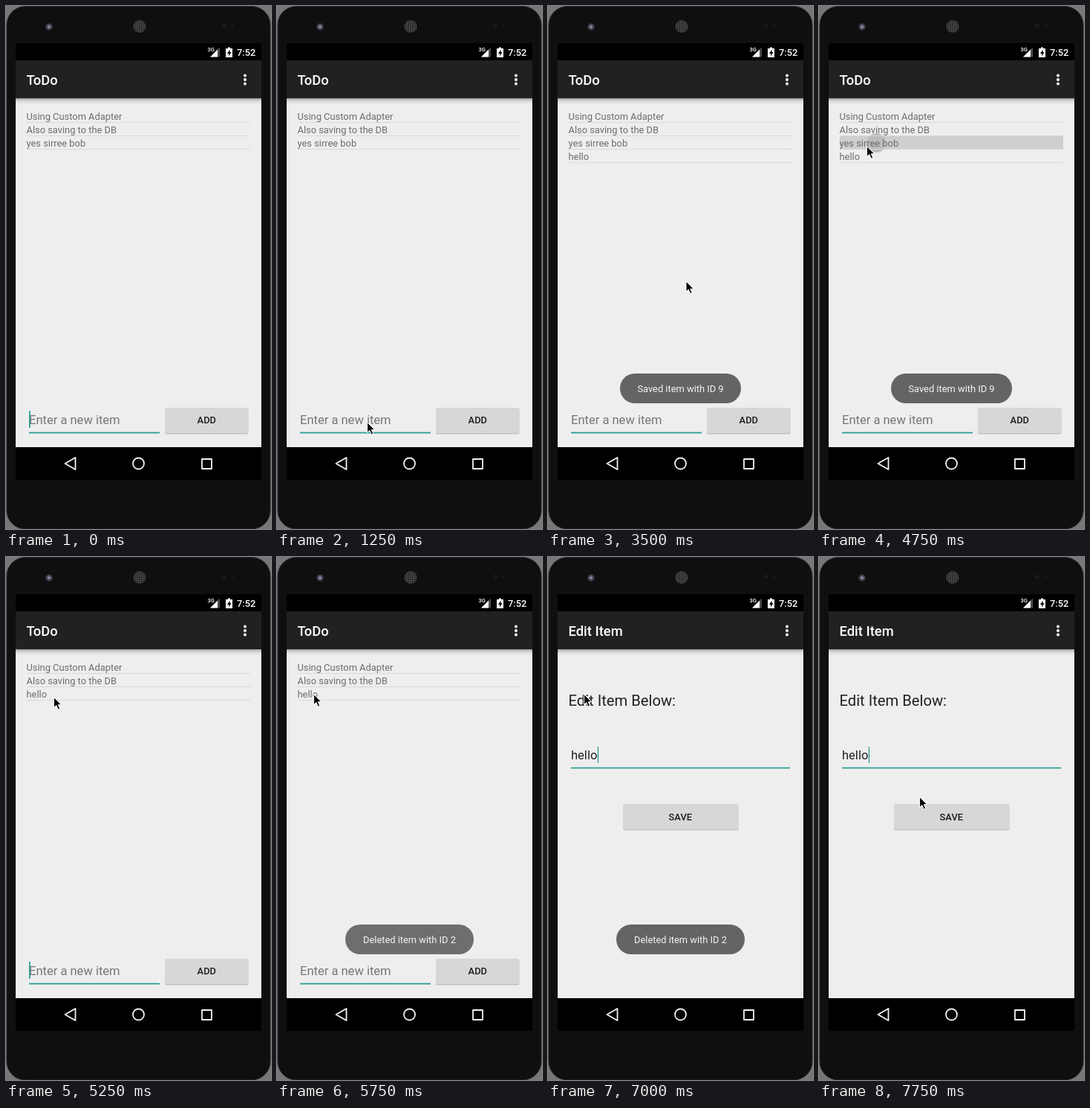
Recreate the animation shown at these times as an HTML page. Size 357 by 703 pixels, loop 8000 ms.

```html
<!DOCTYPE html>
<html lang="en">
<head>
<meta charset="utf-8">
<title>To-do app demo</title>
<style>
  html, body { margin: 0; width: 100%; height: 100%; overflow: hidden; background: #777; }
  svg { display: block; width: 357px; height: 703px; }
  text { font: 12.87px Roboto, "Open Sans", sans-serif; fill: #6d6d6d; white-space: pre; }
  .title { font-size: 18.39px; font-weight: 500; fill: #fff; }
  .clock { font-weight: 500; fill: #fff; }
  .net { font-size: 7.5px; font-weight: 500; fill: #fff; }
  .field { font-size: 16.55px; fill: #212121; }
  .hint { fill: #767676; }
  .label { font-size: 20.2px; fill: #212121; }
  .btn { font-weight: 500; fill: #1c1c1c; text-anchor: middle; }
  .toast text { fill: #f4f4f4; text-anchor: middle; }
  .toast rect { fill: #646464; }
  .accent { fill: #2a9d95; }
  .nav { fill: none; stroke: #f2f2f2; stroke-width: 1.8; stroke-linejoin: round; }
</style>
</head>
<body>
<svg viewBox="0 0 357 703">
  <defs>
    <linearGradient id="drop" x2="0" y2="1">
      <stop offset="0" stop-color="#000" stop-opacity=".34"/>
      <stop offset=".4" stop-color="#000" stop-opacity=".11"/>
      <stop offset="1" stop-color="#000" stop-opacity="0"/>
    </linearGradient>
    <radialGradient id="lens">
      <stop offset="0" stop-color="#b9b9cc"/>
      <stop offset=".4" stop-color="#5c5c70"/>
      <stop offset="1" stop-color="#22222a"/>
    </radialGradient>
    <pattern id="mesh" width="3" height="3" patternUnits="userSpaceOnUse">
      <rect width="3" height="3" fill="#2b2b2b"/>
      <circle cx="1.5" cy="1.5" r=".9" fill="#555"/>
    </pattern>
  </defs>

  <!-- Phone body -->
  <rect x="1" y=".5" width="355" height="702.5" rx="25" fill="#0f0f0f" stroke="#242424"/>
  <circle cx="58" cy="28" r="5" fill="url(#lens)"/>
  <circle cx="180" cy="27.5" r="8.5" fill="url(#mesh)"/>
  <circle cx="294" cy="26.5" r="3" fill="#191919"/>
  <circle cx="305" cy="26.5" r="2" fill="#191919"/>

  <!-- Bars -->
  <rect x="13" y="50" width="331" height="587"/>
  <text class="net" x="271.5" y="61">3G</text>
  <path d="M275 68.5L288 55.5V68.5Z" fill="#4b4b4b"/>
  <path d="M275 68.5L285 58.5V68.5Z" fill="#fff"/>
  <path d="M296 57h3v-1.5h3V57h3v12h-9Z" fill="#fff"/>
  <path d="M301.5 58.5L298 64h2.2v3.5L303.500 62h-2Z"/>
  <text class="clock" x="311" y="67">7:52</text>
  <rect x="13" y="73" width="331" height="51" fill="#212121"/>
  <text class="title" id="title" x="27.500" y="106"></text>
  <g fill="#fff">
    <circle cx="322" cy="93.500" r="2"/>
    <circle cx="322" cy="99" r="2"/>
    <circle cx="322" cy="104.500" r="2"/>
  </g>
  <rect x="13" y="124" width="331" height="469" fill="#eee"/>
  <rect x="13" y="124" width="331" height="8" fill="url(#drop)"/>
  <g class="nav">
    <path d="M79.500 615L93.500 607V623Z"/>
    <circle cx="178.500" cy="615" r="7.500"/>
    <rect x="264" y="609" width="13" height="13"/>
  </g>

  <!-- List screen -->
  <g id="list">
    <g id="held">
      <rect x="28" y="175" width="301" height="18" fill="#cecece"/>
      <circle id="touch" cx="77" cy="184" r="9" fill="#bcbcbc"/>
    </g>
    <g id="rows"></g>
    <text class="field" id="entry" x="31" y="562"></text>
    <rect class="accent" x="31" y="572.700" width="176" height="1.800"/>
    <rect class="accent" id="caret" y="544" width="1.800" height="23"/>
    <rect x="214" y="541" width="112.500" height="34.500" rx="2" fill="#c2c2c2"/>
    <rect id="add" x="214" y="540" width="112" height="34" rx="2"/>
    <ellipse id="ripple" cx="261" cy="571" rx="4" ry="2.800" fill="#a2a2a2"/>
    <text class="btn" x="270.300" y="561">ADD</text>
  </g>

  <!-- Edit screen -->
  <g id="edit">
    <text class="label" x="27.500" y="200">Edit Item Below:</text>
    <text class="field" x="31" y="272">hello</text>
    <rect class="accent" id="editCaret" x="66.800" y="255" width="1.300" height="22"/>
    <rect class="accent" x="31" y="282.700" width="295" height="1.700"/>
    <rect x="101" y="333" width="155.500" height="34.300" rx="2" fill="#c2c2c2"/>
    <rect x="101" y="332" width="155" height="34" rx="2" fill="#d6d7d7"/>
    <text class="btn" x="178.300" y="354">SAVE</text>
  </g>

  <g class="toast" id="saved">
    <rect x="97" y="494" width="163" height="40" rx="20"/>
    <text x="178.500" y="519">Saved item with ID 9</text>
  </g>
  <g class="toast" id="deleted">
    <rect x="92" y="494" width="173" height="40" rx="20"/>
    <text x="178.500" y="519">Deleted item with ID 2</text>
  </g>

  <path id="mouse" d="M0 0V14L3.300 11L5.800 16.600L8.200 15.500L5.800 10.200H10.200Z" stroke="#fff" stroke-width="1"/>
</svg>
<script>
const LOOP = 8000, STEP = 250;
const $ = id => document.getElementById(id);

// Each track holds [start time, value...] until the next entry.
const tracks = {
  mouse: [[0, -50, 0], [250, 219, 421], [500, 158, 505], [750, 121.5, 559.5],
    [1750, 150, 560], [2000, 205, 560], [2250, 237, 560], [2500, 255, 568],
    [2750, 255.5, 574.5], [3250, 240, 500], [3500, 186, 370], [3750, 125, 262],
    [4000, 80, 203], [4250, 64.5, 188.5], [5500, 55, 186], [5750, 49.5, 184.5],
    [6500, 48.5, 184.5], [7250, 56, 202], [7500, 98, 270], [7750, 135.5, 322.5]],
  entry: [[0, ''], [1500, 'he'], [1750, 'hell'], [2000, 'hello'], [2750, '']],
  rows: [[0, 'yes sirree bob'], [2750, 'yes sirree bob', 'hello'], [5250, 'hello']],
  add: [[0, '#d6d7d7'], [2500, '#c4c5c5'], [2750, '#b9baba'], [3000, '#cbcccc'], [3250, '#d6d7d7']],
  touch: [[0, 0], [4500, 9], [4750, 13], [5000, 17], [5250, 0], [6250, 9], [6500, 0]],
  saved: [[0, 0], [3000, .5], [3250, 1], [5000, .5], [5250, 0]],
  deleted: [[0, 0], [5750, .92], [6000, 1], [7500, .4], [7750, 0]]
};
const at = (name, t) => tracks[name].findLast(k => k[0] <= t).slice(1);
const show = (id, on) => $(id).setAttribute('visibility', on ? 'inherit' : 'hidden');
const set = (id, attrs) => {
  for (const key in attrs) $(id).setAttribute(key, attrs[key]);
};

const baseRows = ['Using Custom Adapter', 'Also saving to the DB'];
const rowMarkup = (label, i) => `<text x="27.500" y="${153 + 18 * i}">${label}</text>
  <rect x="28" y="${156 + 18 * i}" width="301" height="1" fill="#d8d8d8"/>`;

function caretOn(t) {
  if (t < 1500) return (t + 250) % 1000 < 500;
  if (t < 3500) return true;
  return t % 1000 < 500;
}

function draw(t) {
  const editing = t >= 6500;
  show('list', !editing);
  show('edit', editing);
  $('title').textContent = editing ? 'Edit Item' : 'ToDo';

  $('rows').innerHTML = [...baseRows, ...at('rows', t)].map(rowMarkup).join('');
  const [typed] = at('entry', t);
  $('entry').textContent = typed || 'Enter a new item';
  $('entry').classList.toggle('hint', !typed);
  set('caret', { x: 31 + (typed ? $('entry').getComputedTextLength() : 0) });
  show('caret', !editing && caretOn(t));
  show('editCaret', editing && (t < 7250 || t >= 7750));

  set('add', { fill: at('add', t)[0] });
  show('ripple', t >= 2500 && t < 3000);
  const [radius] = at('touch', t);
  set('touch', { r: radius, cx: t < 6000 ? 77 : 50 });
  show('held', !editing && radius > 0);
  set('saved', { opacity: at('saved', t)[0] });
  set('deleted', { opacity: at('deleted', t)[0] });
  set('mouse', { transform: `translate(${at('mouse', t)})` });
}

const start = performance.now();
let last = -1;
function tick() {
  const t = Math.floor((performance.now() - start) % LOOP / STEP) * STEP;
  if (t !== last) draw(last = t);
  requestAnimationFrame(tick);
}
tick();
</script>
</body>
</html>
```
